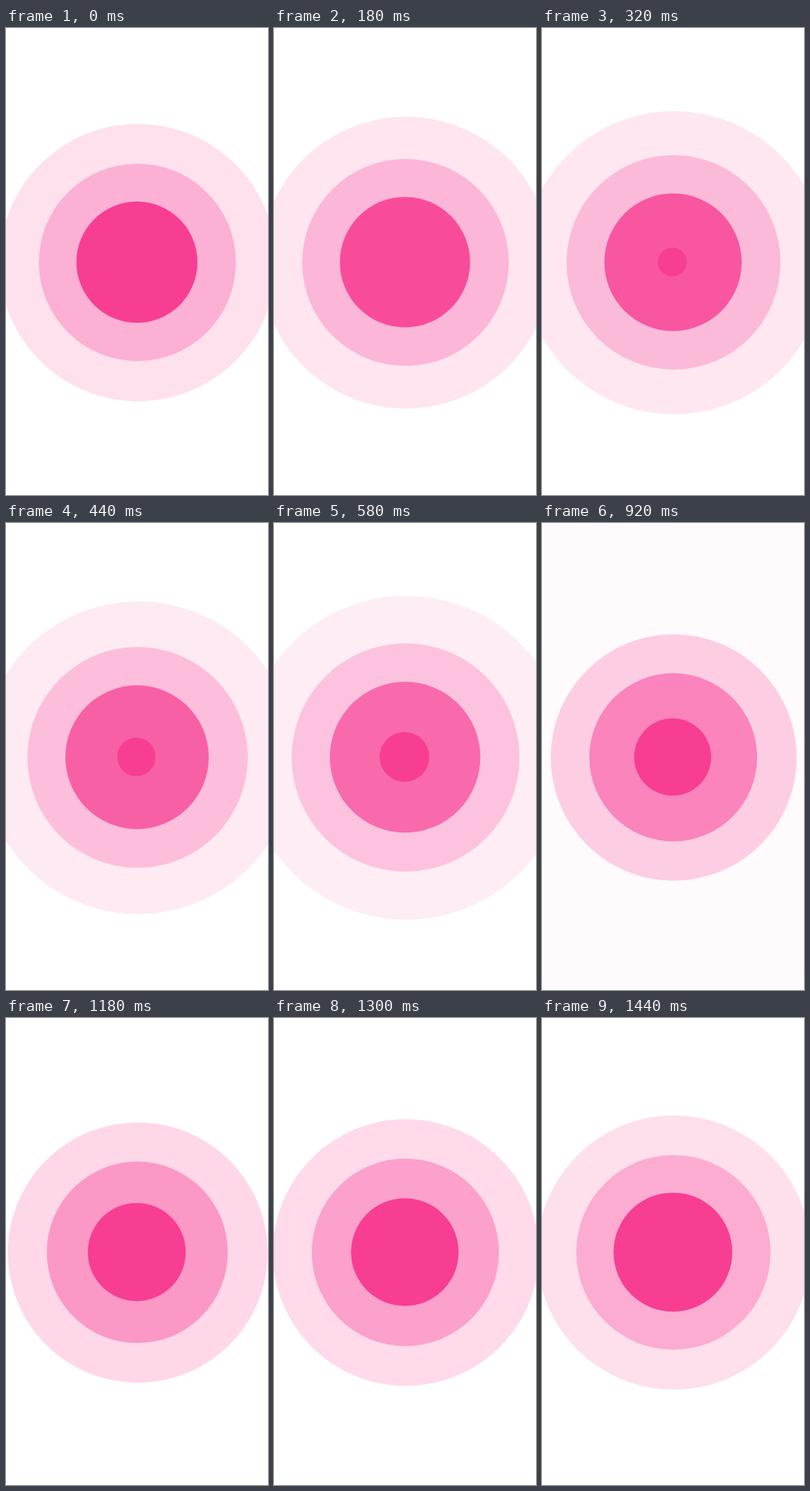
An HTML page that plays this animation: 375x667 px, repeating every 1460 ms.

```html
<!DOCTYPE html>
<html lang="en">
<head>
<meta charset="utf-8">
<title>Pulse</title>
<style>
  html, body { margin: 0; width: 100%; height: 100%; overflow: hidden; background: #fff; }
  svg { display: block; width: 100vw; height: 100vh; }
</style>
</head>
<body>
<svg id="stage" viewBox="0 0 375 667"><rect id="back" width="375" height="667" fill="#fff"/></svg>
<script>
const LOOP = 1460;  // the loop restarts just before a pulse ends
const PULSE = 1500;
const HAZE = 830;   // the widest ring dissolves into the background

const PINK = [247, 62, 146];
const ROSE = [252, 176, 212];
const BLUSH = [254, 225, 237];
const WHITE = [255, 255, 255];

// Outermost first; each ring grows into the next one during a pulse.
const rings = [
  { r: [198, 284], from: BLUSH, to: WHITE, start: 0, end: HAZE },
  { r: [141, 198], from: ROSE, to: BLUSH, start: 0, end: LOOP },
  { r: [86.6, 141.2], from: PINK, to: ROSE, start: 0, end: LOOP },
  { r: [2.2, 88.4], from: PINK, to: PINK, start: 230, end: LOOP }
];

const stage = document.getElementById('stage');
const back = document.getElementById('back');
const lerp = (a, b, k) => a + (b - a) * k;
const mix = (a, b, k) => `rgb(${a.map((v, i) => Math.round(lerp(v, b[i], k)))})`;

for (const ring of rings) {
  ring.el = document.createElementNS('http://www.w3.org/2000/svg', 'circle');
  stage.append(ring.el);
}

function draw(t) {
  const k = t / PULSE;
  const haze = t < HAZE ? 0 : Math.max(0, Math.min(0.155, (1200 - t) / 1800));
  back.setAttribute('fill', mix(WHITE, BLUSH, haze));

  for (const { el, r, from, to, start, end } of rings) {
    const radius = lerp(r[0], r[1], k);
    el.setAttribute('visibility', t >= start && t < end ? 'visible' : 'hidden');
    el.setAttribute('cx', 186.3 + radius * 0.0125);
    el.setAttribute('cy', 333.9 + radius * 0.006);
    el.setAttribute('r', radius);
    el.setAttribute('fill', mix(from, to, k));
  }
}

function tick() {
  draw(performance.now() % LOOP);
  requestAnimationFrame(tick);
}
tick();
</script>
</body>
</html>
```
